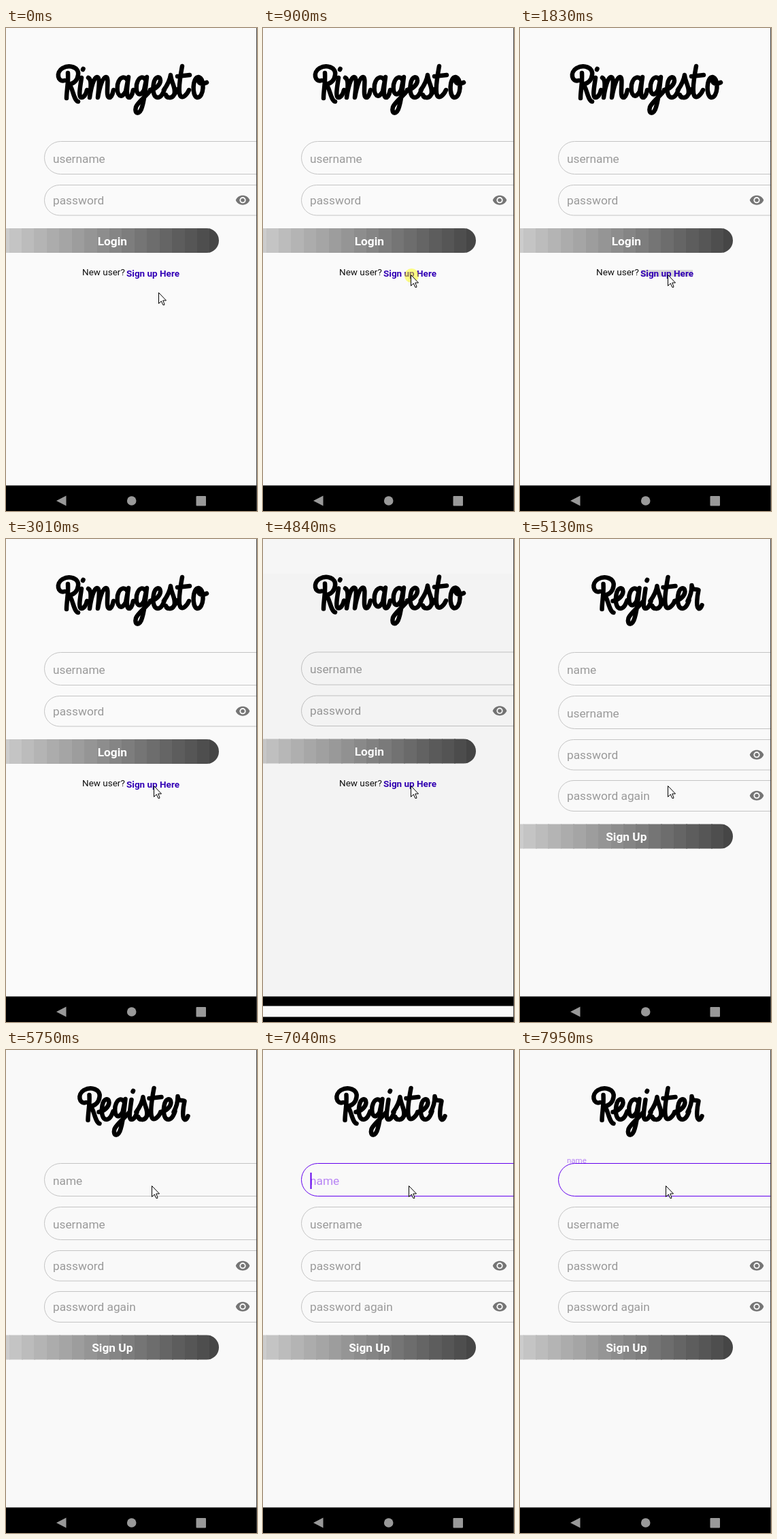
Animation of 369x709 px, one loop 8000 ms. Source, as an HTML page:

```html
<!DOCTYPE html>
<html lang="en">
<head>
<meta charset="utf-8">
<title>Login and register</title>
<style>
html, body { margin: 0; width: 100%; height: 100%; overflow: hidden; background: #fafafa; }
svg { display: block; width: 100%; height: 100%; font-family: Roboto, sans-serif; }
.hint { font-size: 17.3px; fill: #9a9a9a; }
.box { fill: none; stroke: #c4c4c4; }
.btn { font-size: 17.3px; font-weight: 700; fill: #fff; text-anchor: middle; }
.script { fill: none; stroke: #000; stroke-width: 6.5; stroke-linecap: round; stroke-linejoin: round; }
</style>
</head>
<body>
<svg id="stage" viewBox="0 0 369 709"></svg>
<script>
const LOOP = 8000;
const stage = document.getElementById('stage');

function add(parent, tag, attrs = {}, text) {
  const node = document.createElementNS('http://www.w3.org/2000/svg', tag);
  set(node, attrs);
  if (text) node.textContent = text;
  parent.appendChild(node);
  return node;
}
function set(node, attrs) {
  for (const key in attrs) node.setAttribute(key, attrs[key]);
}
const show = (node, on) => node.setAttribute('display', on ? 'inline' : 'none');

// Brush lettering: advance width and pen path of each letter, baseline at 0.
const letters = {
  R: [31, 'M17-36C18-22 15-10 15 1M12-25C2-22-1-37 9-43C20-49 34-44 32-33C31-25 25-20 18-19C24-17 25 4 32 6'],
  a: [27, 'M20-24C17-32 8-32 5-19C3-2 11 3 17-9L21-30C19-16 17 0 22 0C25 0 27-6 28-11'],
  e: [19, 'M0-11C8-12 15-19 15-25C15-32 7-32 5-20C3-8 6 0 11 0C16 0 19-6 21-12'],
  g: [24, 'M19-24C16-32 8-32 5-19C3-3 11-1 16-11L20-30C18-14 17 2 13 14C10 26 1 25 4 14C6 8 18-1 26-11'],
  i: [12, 'M5-29C3-15 0 0 5 0C9 0 12-6 13-11M7-41L7.5-42'],
  m: [39, 'M2-29C8-26 5-10 4 0C6-14 10-30 15-30C20-30 17-12 16 0C19-16 23-30 28-30C34-30 26 0 33 0C36 0 38-6 39-11'],
  o: [25, 'M13-30C4-30 3-2 11 0C21 1 23-28 13-30C11-21 17-18 25-22'],
  r: [18, 'M0-11C4-18 6-26 6-34C7-26 12-29 16-27C14-18 12-2 16 0C18 1 20-2 21-5'],
  s: [18, 'M0-11C5-18 9-26 10-33C11-22 19-12 15-4C12 2 4 1 3-4M15-4C17-6 19-9 20-12'],
  t: [18, 'M8-46C5-30 2-10 5-3C8 3 15-4 18-11M1-31L19-33']
};

function lettering(parent, word, x, gap) {
  const g = add(parent, 'g', { class: 'script', role: 'img', 'aria-label': word });
  for (const ch of word) {
    const [width, d] = letters[ch];
    add(g, 'path', { d, transform: `translate(${x} 102)` });
    x += width + gap;
  }
}

function field(parent, y, h, label, secret) {
  const box = add(parent, 'rect', { class: 'box', x: 56.5, y: y + .5, width: 400, height: h, rx: h / 2 });
  const hint = add(parent, 'text', { class: 'hint', x: 69, y: y + (secret ? 28.5 : 31.5) }, label);
  if (secret) {
    const eye = add(parent, 'g', { transform: `translate(348 ${y + 22.7}) scale(.93)` });
    add(eye, 'path', { d: 'M-11 0C-7.5-10 7.5-10 11 0C7.5 10-7.5 10-11 0Z', fill: '#757575' });
    add(eye, 'circle', { r: 4, fill: '#757575', stroke: '#fafafa', 'stroke-width': 2 });
  }
  return { box, hint };
}

const defs = add(stage, 'defs');
function button(parent, y, label) {
  const clip = add(defs, 'clipPath', { id: 'pill' + y });
  add(clip, 'rect', { x: -40, y, width: 353, height: 36, rx: 18 });
  const g = add(parent, 'g', { 'clip-path': `url(#pill${y})` });
  for (let i = 0; i < 18; i++) {
    const c = Math.round(204 - i * 7.9);
    add(g, 'rect', { x: Math.round(4.5 + (i - 1) * 18.43), y: y - 1, width: 20, height: 38, fill: `rgb(${c},${c},${c})` });
  }
  add(parent, 'text', { class: 'btn', x: 156.3, y: y + 24.7 }, label);
}

const paper = add(stage, 'rect', { width: 369, height: 709 });

const login = add(stage, 'g');
lettering(login, 'Rimagesto', 74, 1);
field(login, 166, 48, 'username');
field(login, 230, 44.5, 'password', true);
button(login, 294, 'Login');
add(login, 'text', { x: 112, y: 363, 'font-size': 13.5, fill: '#111' }, 'New user?');
const press = add(login, 'rect', { x: 178, y: 355, width: 76, height: 10, fill: '#d9d9d9' });
add(login, 'text', { x: 177, y: 364.8, 'font-size': 13.5, 'font-weight': 700, fill: '#3200b6' }, 'Sign up Here');

const register = add(stage, 'g');
lettering(register, 'Register', 105.5, 0);
const name = field(register, 166, 48, 'name');
field(register, 230, 48, 'username');
field(register, 294, 44.5, 'password', true);
field(register, 354, 45, 'password again', true);
button(register, 418.5, 'Sign Up');
const caret = add(register, 'rect', { x: 69.5, y: 180, width: 2, height: 24, fill: '#6200ee' });

const shade = add(stage, 'g');
add(shade, 'rect', { width: 369, height: 51, fill: '#000', opacity: .016 });
add(shade, 'rect', { y: 51, width: 369, height: 621, fill: '#000', opacity: .028 });

const bar = add(stage, 'rect', { width: 369, height: 40 });
const icons = add(stage, 'g', { fill: '#999' });
add(icons, 'path', { d: 'M74 694L88.5 686.5V701.5Z' });
add(icons, 'circle', { cx: 184.7, cy: 694, r: 6.8 });
add(icons, 'rect', { x: 279.5, y: 687, width: 14.5, height: 14.5, rx: 1 });
const sheet = add(stage, 'rect', { y: 685.5, width: 369, height: 16, fill: '#fafafa' });
const topLine = add(stage, 'rect', { width: 369, height: 1 });
add(stage, 'rect', { x: 368, width: 1, height: 709, fill: '#444' });

const halo = add(stage, 'circle', { r: 10.5, fill: '#ff0', opacity: .47 });
const pointer = add(stage, 'path', {
  d: 'M.5.5V16.5L4.3 12.9L6.8 18.5H8.8V17L6.7 12H11.5Z', fill: '#fff', stroke: '#000'
});

// Fraction of a move that is sampled in equal hard steps.
function stepped(t, start, end, steps) {
  if (t < start) return 0;
  const n = Math.min(steps, Math.floor((t - start) / (end - start) * (steps - 1)) + 1);
  const p = n / steps;
  return p * p * (3 - 2 * p);
}
const within = (t, a, b) => t >= a && t < b;

function draw(t) {
  const opening = within(t, 4840, 5020);
  const settling = within(t, 5020, 5130);
  const second = t >= 5020;

  set(paper, { fill: t >= 5130 ? '#f9f9f9' : '#fafafa' });
  show(login, !second);
  show(register, second);
  set(login, { transform: `translate(0 ${opening ? -.5 : 0})` });
  set(register, { transform: `translate(0 ${settling ? 2 : 0})` });
  show(press, within(t, 1830, 3010));
  show(shade, opening);
  show(sheet, opening);
  show(icons, !opening);
  show(topLine, settling);
  set(bar, { y: settling ? 673.5 : 671.5 });

  const a = stepped(t, 80, 440, 5);
  const b = stepped(t, 5480, 5750, 4);
  const x = 224 - 7 * a - 3 * b;
  const y = 388 - 26 * a - 163 * b;
  set(pointer, { transform: `translate(${Math.round(x)} ${Math.round(y)})` });
  show(halo, within(t, 900, 1180) || within(t, 6140, 6280));
  set(halo, { cx: x + 1.5, cy: y + 1.5 });

  const focus = t >= 7040;
  name.box.style.stroke = focus ? '#6200ee' : '';
  const lift = t >= 7620 ? 2 : t >= 7400 ? 1 : 0;
  set(name.hint, { y: [197.5, 169.5, 166][lift] });
  name.hint.style.fontSize = [17.3, 12, 11.5][lift] + 'px';
  name.hint.style.fill = focus ? '#b885f4' : t >= 6450 ? '#a596b8' : '';
  show(caret, within(t, 7040, 7950));
}

function tick(now) {
  draw(now % LOOP);
  requestAnimationFrame(tick);
}
draw(0);
requestAnimationFrame(tick);
</script>
</body>
</html>
```
